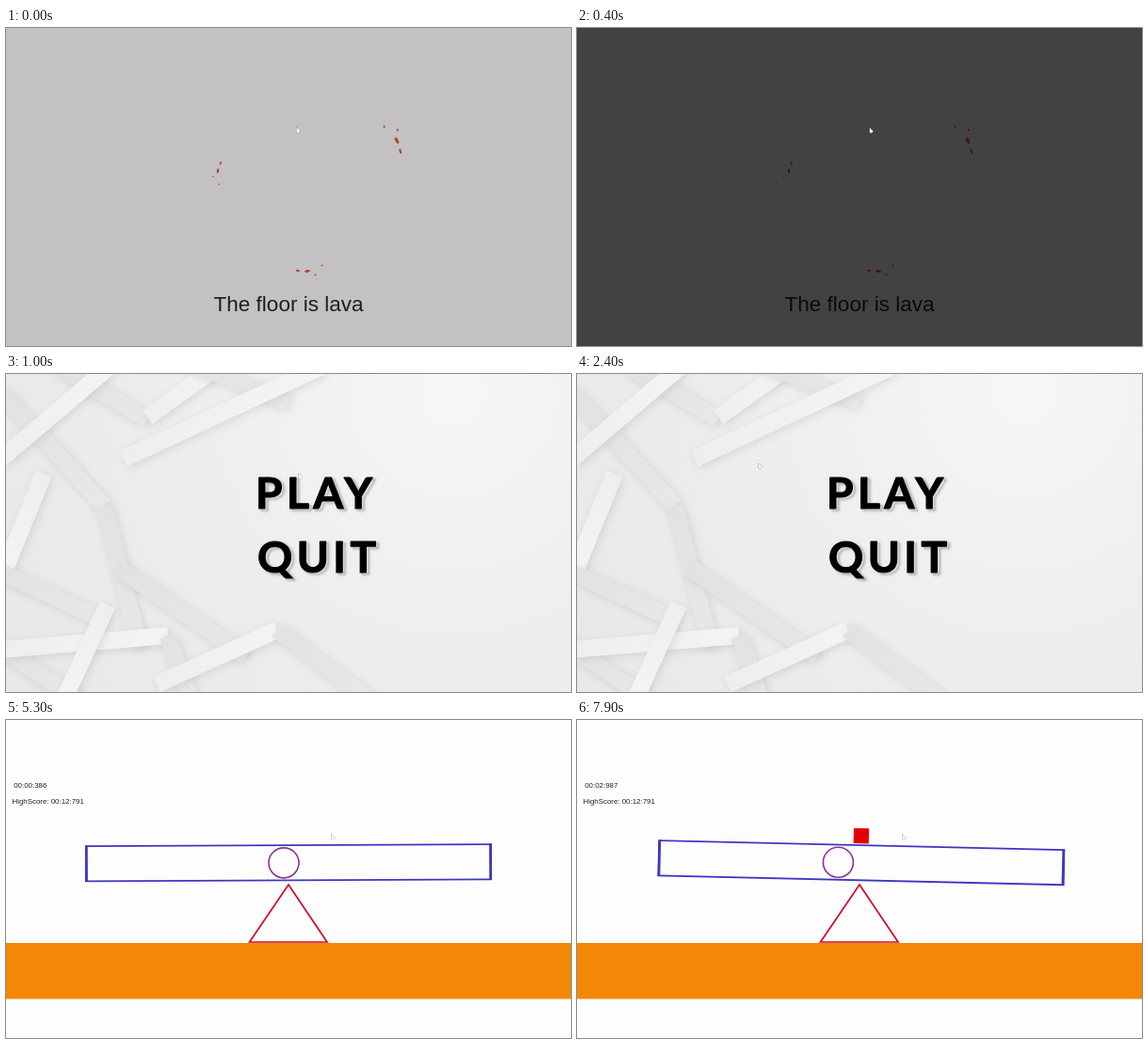
An HTML page with a canvas for the animation above (8 s loop, 600 by 338 pixels).

```html
<!DOCTYPE html>
<html lang="en">
<head>
<meta charset="utf-8">
<title>Balance game</title>
<style>
html, body { margin: 0; width: 100%; height: 100%; overflow: hidden; background: #000; }
canvas { display: block; }
</style>
</head>
<body>
<canvas id="stage" width="600" height="338"></canvas>
<script>
const W = 600, H = 338, LOOP = 8000, STEP = 100;
const ctx = document.getElementById('stage').getContext('2d');
const SANS = '"Liberation Sans", Arial, sans-serif';
const RAD = Math.PI / 180;
const clamp = v => Math.max(0, Math.min(1, v));
const smooth = v => v * v * (3 - 2 * v);

// Follow a list of moves {from, to, at: [...values]} up to time t
function follow(first, moves, t, ease = v => v) {
  return moves.reduce((now, { from, to, at }) => {
    const k = ease(clamp((t - from) / (to - from)));
    return now.map((v, i) => v + (at[i] - v) * k);
  }, first);
}

function poly(c, pts) {
  c.beginPath();
  pts.forEach(([x, y]) => c.lineTo(x, y));
  c.closePath();
}

function placed(x, y, deg, scale, paint) {
  ctx.save();
  ctx.translate(x, y);
  ctx.rotate(deg * RAD);
  ctx.scale(scale, scale);
  paint();
  ctx.restore();
}

function text(str, x, y, size, color, align = 'left') {
  ctx.font = `${size}px ${SANS}`;
  ctx.textAlign = align;
  ctx.fillStyle = color;
  ctx.fillText(str, x, y);
}

function ellipse(x, y, a, b, turn) {
  ctx.beginPath();
  ctx.ellipse(x, y, a, b, turn, 0, 7);
  ctx.fill();
}

function spray() {
  ellipse(0, 0, 3, 1.4, -0.15);
  ellipse(-10, -0.5, 2.3, 1, 0.1);
  ellipse(8.5, 4, 1.1, 0.8, 0);
  ellipse(15.5, -6, 1, 0.8, 0);
}

function drawTitle(t) {
  ctx.fillStyle = '#c3c1c3';
  ctx.fillRect(0, 0, W, H);
  // The same spray, turned about a third of a circle each time
  ctx.fillStyle = '#b24433';
  placed(320, 258.4, 0, 1, spray);
  placed(225, 151.8, 106, 0.86, spray);
  placed(415, 119.6, -111, 1.2, spray);
  text('The floor is lava', 300, 301, 22.5, '#1e1e1e', 'center');
  ctx.fillStyle = `rgba(0,0,0,${clamp(t / 612)})`;
  ctx.fillRect(0, 0, W, H);
}

// Folded paper ribbons, each a path through a few corners
const RIBBONS = [
  '-5,20 104,140 142,290', '55,-8 150,48', '150,46 225,-8', '-5,90 110,-8',
  '195,-12 300,30', '125,90 335,-8', '-5,292 75,345', '120,206 255,300',
  '40,106 -3,212 105,262', '-5,293 172,278 195,345', '108,245 62,345',
  '160,330 288,272 385,345'
].map(path => path.split(' ').map(p => p.split(',').map(Number)));

function ribbonPart(c, [x1, y1], [x2, y2]) {
  const len = Math.hypot(x2 - x1, y2 - y1);
  const nx = (y1 - y2) / len * 9, ny = (x2 - x1) / len * 9;
  // Rising ribbons catch the light
  const v = (x2 - x1) * (y2 - y1) < 0 ? 241 : 229;
  const g = c.createLinearGradient(x1, y1, x2, y2);
  g.addColorStop(0, `rgb(${v - 3},${v - 3},${v - 1})`);
  g.addColorStop(1, `rgb(${v + 3},${v + 3},${v + 5})`);
  c.fillStyle = g;
  poly(c, [[x1 + nx, y1 + ny], [x2 + nx, y2 + ny], [x2 - nx, y2 - ny], [x1 - nx, y1 - ny]]);
  c.fill();
}

function setShadow(c, color, blur, shift) {
  c.shadowColor = color;
  c.shadowBlur = blur;
  c.shadowOffsetX = c.shadowOffsetY = shift;
}

function menuLabel(c, str, x, y) {
  setShadow(c, 'rgba(0,0,0,.5)', 2.5, 2.7);
  c.strokeText(str, x, y);
  setShadow(c, 'transparent', 0, 0);
  c.fillText(str, x, y);
}

function buildMenu() {
  const el = document.createElement('canvas');
  el.width = W;
  el.height = H;
  const c = el.getContext('2d');
  const g = c.createRadialGradient(475, 20, 10, 475, 20, 560);
  ['#f6f6f6', '#f0f0f0', '#ebebeb', '#e8e8ea'].forEach((color, i) => g.addColorStop(i / 3, color));
  c.fillStyle = g;
  c.fillRect(0, 0, W, H);

  setShadow(c, 'rgba(120,120,130,.2)', 9, 2);
  for (const path of RIBBONS) {
    for (let i = 1; i < path.length; i++) ribbonPart(c, path[i - 1], path[i]);
  }

  c.font = '700 46px Lato, "Open Sans", sans-serif';
  c.letterSpacing = '4.5px';
  c.textAlign = 'center';
  c.fillStyle = c.strokeStyle = '#000';
  c.lineWidth = 1.2;
  c.lineJoin = 'round';
  menuLabel(c, 'PLAY', 329.3, 142.6);
  menuLabel(c, 'QUIT', 332.3, 210.6);
  return el;
}
const menu = buildMenu();

function showMenu(alpha) {
  ctx.globalAlpha = clamp(alpha);
  ctx.drawImage(menu, 0, 0);
  ctx.globalAlpha = 1;
}

// Board tilt in degrees and the ball's x
const SWINGS = [
  { from: 4700, to: 5300, at: [-0.27, 295] },
  { from: 5300, to: 6500, at: [-0.93, 304.4] },
  { from: 6500, to: 7900, at: [1.33, 277.4] }
];
const DROP = 5550, LAND = 6300, SPEED = 50, GRAVITY = 331;

function clock(ms) {
  const pad = (v, n) => String(Math.floor(v)).padStart(n, '0');
  return `${pad(ms / 60000, 2)}:${pad(ms / 1000 % 60, 2)}:${pad(ms % 1000, 3)}`;
}

function board() {
  ctx.strokeStyle = ctx.fillStyle = '#3b37c0';
  ctx.lineWidth = 1.8;
  ctx.strokeRect(-215, -18.6, 430, 37.2);
  for (const x of [-216, 213.2]) ctx.fillRect(x, -19.3, 2.8, 38.6);
}

function cube() {
  ctx.fillStyle = '#e60000';
  ctx.fillRect(-8.1, -8.1, 16.2, 16.2);
}

function drawGame(t) {
  ctx.fillStyle = '#fdfdfd';
  ctx.fillRect(0, 0, W, H);
  ctx.fillStyle = '#f38807';
  ctx.fillRect(0, 237, W, 59.5);

  ctx.strokeStyle = '#cc0a28';
  ctx.lineWidth = 1.7;
  poly(ctx, [[300, 175], [341, 236], [258.6, 236]]);
  ctx.stroke();

  const [tilt, ballX] = follow([0, 300], SWINGS, t, smooth);
  const slide = Math.max(0, tilt * 1.4);
  placed(300 + slide, 151.7, tilt, 1, board);

  ctx.strokeStyle = '#8c2f96';
  ctx.lineWidth = 1.6;
  ctx.beginPath();
  ctx.arc(ballX, 152 + (ballX - 300) * 0.03, 16, 0, 7);
  ctx.stroke();

  if (t >= DROP) {
    const s = (Math.min(t, LAND) - DROP) / 1000;
    const y = -7.4 + SPEED * s + GRAVITY * s * s / 2;
    placed(300 + slide, y, t < LAND ? 0 : tilt, 1, cube);
  }

  text(clock(Math.max(0, (t - 4914) * 1.0004)), 8.2, 72, 7.9, '#222');
  text('HighScore: 00:12:791', 6.5, 89, 7.9, '#222');
}

const POINTER = [
  { from: 0, to: 200, at: [310.8, 106] },
  { from: 1400, to: 1800, at: [430.5, 102] },
  { from: 2300, to: 2400, at: [193, 95] },
  { from: 2800, to: 3150, at: [61, 117] },
  { from: 3150, to: 3500, at: [355, 135] },
  { from: 3500, to: 3700, at: [340, 104] },
  { from: 3900, to: 4200, at: [345.5, 121.5] }
];

function drawPointer(t) {
  const [x, y] = follow([308.5, 105.5], POINTER, t);
  poly(ctx, [[x, y], [x, y + 5.2], [x + 2.2, y + 5.4], [x + 3.7, y + 3.8]]);
  ctx.strokeStyle = 'rgba(60,60,70,.6)';
  ctx.lineWidth = 0.8;
  ctx.stroke();
  ctx.fillStyle = '#fff';
  ctx.fill();
}

function draw(t) {
  if (t < 1000) {
    drawTitle(t);
    showMenu((t - 600) / 400);
  } else if (t < 4700) {
    showMenu(1);
  } else {
    drawGame(t);
    showMenu((4900 - t) / 300);
  }
  drawPointer(t);
}

const start = performance.now();
function frame() {
  const t = (performance.now() - start) % LOOP;
  draw(Math.floor(t / STEP) * STEP);
  requestAnimationFrame(frame);
}
frame();
</script>
</body>
</html>
```
